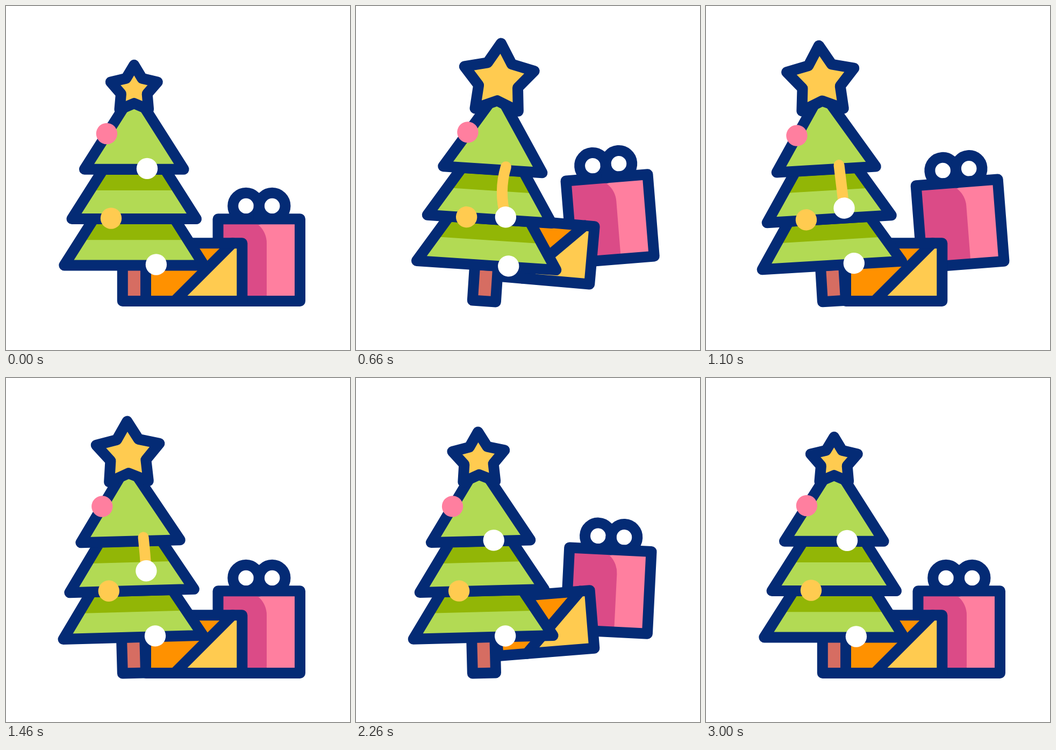
An HTML page with a canvas that plays this animation: 640x640 px, repeating every 3.02 s.

```html
<!DOCTYPE html>
<html lang="en">
<head>
<meta charset="utf-8">
<title>Christmas tree and gifts</title>
<style>
  html, body { margin: 0; width: 100%; height: 100%; overflow: hidden; background: #fff; }
  canvas { display: block; width: 640px; height: 640px; }
</style>
</head>
<body>
<canvas id="stage" width="640" height="640"></canvas>
<script>
const ctx = document.getElementById('stage').getContext('2d');
const LOOP = 3020;
const NAVY = '#042b75', YELLOW = '#ffcb50', PINK = '#ff7f9f', ROSE = '#db4b87',
  LIME = '#b2da54', GREEN = '#92b606', ORANGE = '#ff9100', BARK = '#d66d62', WHITE = '#fff';

const clamp = x => Math.min(1, Math.max(0, x));
const ease = x => x * x * (3 - 2 * x);

// Eased value through [time, value] keys
function keyed(t, keys) {
  if (t <= keys[0][0]) return keys[0][1];
  for (let i = 1; i < keys.length; i++) {
    const [t0, a] = keys[i - 1], [t1, b] = keys[i];
    if (t < t1) return a + (b - a) * ease((t - t0) / (t1 - t0));
  }
  return keys[keys.length - 1][1];
}

function poly(points, fill, outline = true) {
  ctx.beginPath();
  for (const [x, y] of points) ctx.lineTo(x, y);
  ctx.closePath();
  if (fill) { ctx.fillStyle = fill; ctx.fill(); }
  if (outline) { ctx.strokeStyle = NAVY; ctx.stroke(); }
}

function line(x0, y0, x1, y1) {
  ctx.beginPath();
  ctx.moveTo(x0, y0);
  ctx.lineTo(x1, y1);
  ctx.strokeStyle = NAVY;
  ctx.stroke();
}

function ball(x, y, color) {
  ctx.beginPath();
  ctx.arc(x, y, 19.7, 0, 7);
  ctx.fillStyle = color;
  ctx.fill();
}

const box = (l, t, r, b) => [[l, t], [r, t], [r, b], [l, b]];

function posed(px, py, degrees, lift, draw) {
  ctx.save();
  ctx.translate(px, py - lift);
  ctx.rotate(degrees * Math.PI / 180);
  ctx.translate(-px, -py);
  draw();
  ctx.restore();
}

// A jump: rise leaning one way, rock to the other, hold, drop
const SHORT = [280, 550, 820, 1100], LONG = [380, 700, 1020, 1400];

function jump(t, start, [rise, rock, hold, land], side) {
  const s = t - start;
  return {
    lift: keyed(s, [[0, 0], [rise, 1], [hold, 1], [land, 0]]),
    tilt: side * keyed(s, [[0, 0], [rise, 5], [rock, -5], [hold, -5], [land, 0]])
  };
}

function drawGift() {
  for (const x of [446.5, 495.2]) {
    ctx.beginPath();
    ctx.arc(x, 372, 24.3, 0, 7);
    ctx.fillStyle = WHITE;
    ctx.fill();
    ctx.strokeStyle = NAVY;
    ctx.stroke();
  }
  const body = box(394.5, 396.2, 547, 549);
  poly(body, PINK, false);
  ctx.beginPath();
  ctx.moveTo(394.5, 396);
  ctx.lineTo(440, 396);
  ctx.arc(440, 441, 45, -Math.PI / 2, 0);
  ctx.lineTo(485, 549);
  ctx.lineTo(394.5, 549);
  ctx.fillStyle = ROSE;
  ctx.fill();
  poly(body);
  line(470.8, 372, 470.8, 396.5);
}

function drawParcel() {
  const body = box(260, 441.2, 439.3, 549);
  poly(body, ORANGE, false);
  poly([[421.5, 441], [439, 441], [439, 549], [313.5, 549]], YELLOW, false);
  line(421.5, 441, 313.5, 549);
  poly(body);
}

// Tree tier between two heights, sides at a constant slope
const SLOPE = 0.635, MID = 238.3;
const tier = (half, base, top, bottom) => {
  const a = half - (base - top) * SLOPE, b = half - (base - bottom) * SLOPE;
  return [[MID - a, top], [MID + a, top], [MID + b, bottom], [MID - b, bottom]];
};

function drawTier(half, base, top, shade) {
  const shape = tier(half, base, top, base);
  poly(shape, LIME, false);
  if (shade) poly(tier(half, base, top, shade), GREEN, false);
  poly(shape);
}

function drawStar(scale) {
  const points = [];
  for (let i = 0; i < 10; i++) {
    const r = (i % 2 ? 25.6 : 45.7) * scale, a = i * Math.PI / 5;
    points.push([MID + r * Math.sin(a), 192.8 - 37.3 * scale - r * Math.cos(a)]);
  }
  poly(points, YELLOW);
}

function drawTree(t) {
  poly(box(216.8, 482, 260, 549), BARK);
  drawTier(130, 482.4, 396, 435.3);
  drawTier(115.8, 396, 304, 343);
  drawTier(92.3, 303.7, 158.5);
  drawStar(keyed(t, [[0, 1], [600, 1.5], [3010, 1]]));

  const drop = 88.5 * (t < 600 ? ease(t / 600) : 1 - Math.pow(clamp((t - 600) / 1660), 1.576));
  const bend = keyed(t, [[0, 0], [600, -14], [1200, 1], [1800, 0]]);
  const x = 262.5 + drop * 0.0635, y = 302.4 + drop;
  if (drop > 1) {
    ctx.beginPath();
    ctx.moveTo(262.5, 297);
    ctx.quadraticCurveTo((262.5 + x) / 2 + bend, (297 + y) / 2, x, y);
    ctx.strokeStyle = YELLOW;
    ctx.stroke();
  }
  ball(187.4, 237.5, PINK);
  ball(195.5, 395, YELLOW);
  ball(x, y, WHITE);
  ball(279.4, 481, WHITE);
}

function frame(now) {
  const t = now % LOOP;
  ctx.fillStyle = WHITE;
  ctx.fillRect(0, 0, 640, 640);
  ctx.lineWidth = 20;
  ctx.lineCap = ctx.lineJoin = 'round';

  const gift = t < 1500 ? jump(t, 0, LONG, 1) : jump(t, 1900, SHORT, 1);
  posed(470.8, 449, gift.tilt, gift.lift * 77, drawGift);

  const parcel = t < 1500 ? jump(t, 0, SHORT, -1) : jump(t, 1600, LONG, 1);
  posed(350, 495, parcel.tilt, parcel.lift * 39, drawParcel);

  const sway = keyed(t, [[0, 0], [600, 4], [1200, -4], [1800, 2], [2400, -2], [3000, 0]]);
  posed(238, 548, sway, 0, () => drawTree(t));
}

const begin = performance.now();
function tick() {
  frame(performance.now() - begin);
  requestAnimationFrame(tick);
}
tick();
</script>
</body>
</html>
```
